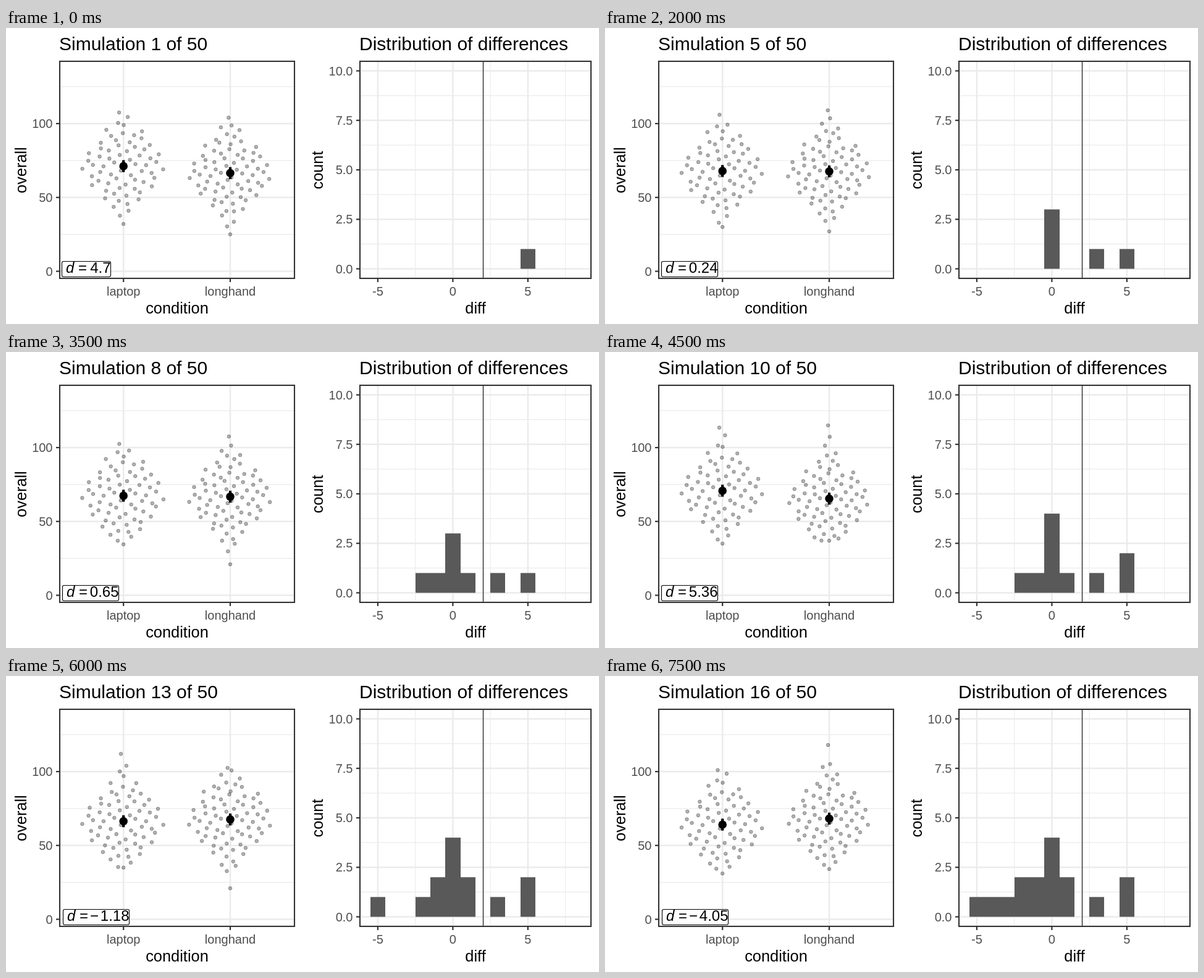
Recreate the animation shown at these times as an HTML page. Size 960 px wide and 480 px high, loop 8000 ms.

```html
<!DOCTYPE html>
<html lang="en">
<head>
<meta charset="utf-8">
<title>Simulation</title>
<style>
  html, body { margin: 0; width: 100%; height: 100%; overflow: hidden; background: #fff; }
  svg { display: block; width: 960px; height: 480px; font-family: "Liberation Sans", Arial, sans-serif; }
  .title { font-size: 30px; }
  .axis { font-size: 25.4px; text-anchor: middle; }
  .tick { font-size: 20px; fill: #4d4d4d; }
  .label { font-size: 24px; }
  .dots circle { fill-opacity: .3; stroke: #000; stroke-opacity: .3; }
</style>
</head>
<body>
<svg id="stage" viewBox="0 0 960 480"></svg>
<script>
const STEP = 500;
// difference, laptop mean, laptop min and max, longhand min and max
const SIMS = [
  [4.7, 71.2, 32, 107.5, 25, 104],
  [-0.31, 67.5, 28, 108, 30, 109],
  [3.17, 69.1, 29.5, 129.5, 30, 110.5],
  [0.38, 68.3, 31, 109, 29, 106],
  [0.24, 67.9, 30, 106, 27, 109],
  [-2.49, 67.4, 32.5, 110, 16.5, 111.5],
  [-1.12, 67, 29, 107, 31, 110],
  [0.65, 67.4, 34.5, 102.5, 21, 107.5],
  [-0.27, 67.8, 30, 108, 28, 107],
  [5.36, 70.8, 35, 113.5, 37, 115],
  [-4.86, 65.2, 28, 105, 32, 112],
  [1.14, 68.6, 31, 108, 27, 106],
  [-1.18, 66.4, 35, 112, 21, 102.5],
  [-2.13, 66.5, 29, 106, 30, 109],
  [-2.94, 66, 28, 107, 31, 110],
  [-4.05, 64.1, 31, 101, 34, 118]
];
const GROUPS = [
  { name: "laptop", x: 190.2, n: 68 },
  { name: "longhand", x: 363, n: 74 }
];
const SPREAD = 17.5, SWARM_WIDTH = 69;

const scoreY = v => 394.5 - v * 2.395;
const diffX = v => 723.4 + v * 24.3;
const countY = v => 390.5 - v * 32.1;

const stage = document.getElementById("stage");

function add(parent, tag, attrs, text) {
  const el = document.createElementNS("http://www.w3.org/2000/svg", tag);
  for (const key in attrs) el.setAttribute(key, attrs[key]);
  if (text !== undefined) el.textContent = text;
  parent.appendChild(el);
  return el;
}
const line = (parent, x1, y1, x2, y2, stroke, width) =>
  add(parent, "line", { x1, y1, x2, y2, stroke, "stroke-width": width });
const write = (parent, x, y, cls, text, more) =>
  add(parent, "text", { x, y, class: cls, ...more }, text);

function grid(box, xs, ys, width) {
  ys.forEach(y => line(stage, box.l, y, box.r, y, "#ebebeb", width));
  xs.forEach(x => line(stage, x, box.t, x, box.b, "#ebebeb", width));
}
function frame(box, xs, ys) {
  add(stage, "rect", { x: box.l, y: box.t, width: box.r - box.l, height: box.b - box.t,
    fill: "none", stroke: "#333", "stroke-width": 2.1 });
  xs.forEach(([x, text]) => {
    line(stage, x, box.b, x, box.b + 6, "#333", 2.2);
    write(stage, x, 434, "tick", text, { "text-anchor": "middle" });
  });
  ys.forEach(([y, text]) => {
    line(stage, box.l - 6, y, box.l, y, "#333", 2.2);
    write(stage, box.l - 11.5, y + 7, "tick", text, { "text-anchor": "end" });
  });
}
function axisTitles(x, xText, y, yText) {
  write(stage, x, 463, "axis", xText);
  write(stage, 0, 0, "axis", yText, { transform: `translate(${y} 230.5) rotate(-90)` });
}

function random(seed) {
  return () => {
    seed = (seed + 0x6D2B79F5) | 0;
    let t = Math.imul(seed ^ (seed >>> 15), 1 | seed);
    t = (t + Math.imul(t ^ (t >>> 7), 61 | t)) ^ t;
    return ((t ^ (t >>> 14)) >>> 0) / 4294967296;
  };
}

// Rational approximation of the normal quantile
function quantile(p) {
  if (p > .5) return -quantile(1 - p);
  const t = Math.sqrt(-2 * Math.log(p));
  return (2.515517 + .802853 * t + .010328 * t * t) /
    (1 + 1.432788 * t + .189269 * t * t + .001308 * t ** 3) - t;
}

function vanDerCorput(i) {
  let value = 0;
  for (let unit = .5; i; i >>= 1, unit /= 2) value += (i & 1) * unit;
  return value;
}

// Sorted normal scores whose tails bend to reach the given extremes
function scores(n, mean, min, max, seed) {
  const rand = random(seed), zMax = quantile(1 - .5 / n);
  return Array.from({ length: n }, (_, i) => {
    const inner = i > 0 && i < n - 1;
    const z = quantile((i + .5 + (inner ? (rand() - .5) * 1.1 : 0)) / n);
    const tail = (z < 0 ? mean - min : max - mean) / zMax;
    return mean + z * (SPREAD + (tail - SPREAD) * Math.abs(z / zMax) ** 3);
  }).sort((a, b) => a - b);
}

// Quasirandom offsets, scaled by the local density
function swarm(values) {
  const bandwidth = .45 * SPREAD * values.length ** -.2;
  const density = values.map(v =>
    values.reduce((sum, w) => sum + Math.exp(-.5 * ((v - w) / bandwidth) ** 2), 0));
  const peak = Math.max(...density);
  return values.map((v, i) => [
    (vanDerCorput(i + 1) - .5) * 2 * SWARM_WIDTH * density[i] / peak, scoreY(v)
  ]);
}

const left = { l: 87, r: 467, t: 54, b: 406 };
const right = { l: 573, r: 947, t: 54, b: 406 };

add(stage, "rect", { width: 960, height: 480, fill: "#fff" });
grid(left, [], [25, 75, 125].map(scoreY), 1.1);
grid(left, GROUPS.map(g => g.x), [0, 50, 100].map(scoreY), 2.5);
grid(right, [-2.5, 2.5, 7.5].map(diffX), [1.25, 3.75, 6.25, 8.75].map(countY), 1.1);
grid(right, [-5, 0, 5].map(diffX), [0, 2.5, 5, 7.5, 10].map(countY), 2.5);

const views = SIMS.map(([diff, mean, ...ends], s) => {
  const view = add(stage, "g", { visibility: "hidden" });
  write(view, 86, 36, "title", `Simulation ${s + 1} of ${SIMS.length + 34}`);

  GROUPS.forEach((group, k) => {
    const center = mean - k * diff;
    const dots = add(view, "g", { class: "dots" });
    swarm(scores(group.n, center, ends[2 * k], ends[2 * k + 1], s * 2 + k + 11))
      .forEach(([dx, cy]) => add(dots, "circle", { cx: group.x + dx, cy, r: 2.8 }));
    const y = scoreY(center);
    line(view, group.x, y - 9.7, group.x, y + 9.7, "#000", 4.2);
    add(view, "circle", { cx: group.x, cy: y, r: 6.8 });
  });

  const digits = String(Math.abs(diff)), negative = diff < 0;
  const x = negative ? 92.5 : digits.length > 3 ? 91.5 : 90.5;
  const end = negative ? 199.5 : digits.length > 3 ? 182.5 : 169.5;
  add(view, "rect", { x, y: 378.5, width: end - x, height: 25, rx: 2.5, fill: "#fff", stroke: "#000", "stroke-width": 1.1 });
  write(view, x + 6.5, 397, "label", "d", { "font-style": "italic" });
  write(view, x + 26.5, 397, "label", "=");
  if (negative) write(view, x + 43.5, 397, "label", "\u2212");
  write(view, end, 397, "label", digits, { "text-anchor": "end" });

  const counts = {};
  SIMS.slice(0, s + 1).forEach(([d]) => {
    const bin = Math.round(d);
    counts[bin] = (counts[bin] || 0) + 1;
  });
  for (const bin in counts) {
    add(view, "rect", { x: Math.round(diffX(bin - .5)), y: countY(counts[bin]),
      width: Math.round(diffX(+bin + .5)) - Math.round(diffX(bin - .5)),
      height: countY(0) - countY(counts[bin]), fill: "#595959" });
  }
  return view;
});

line(stage, 772.5, right.t, 772.5, right.b, "#000", 1.1);
frame(left, GROUPS.map(g => [g.x, g.name]), [0, 50, 100].map(v => [scoreY(v), v]));
frame(right, [-5, 0, 5].map(v => [diffX(v), v]),
  [0, 2.5, 5, 7.5, 10].map(v => [countY(v), v.toFixed(1)]));
axisTitles(277, "condition", 32.5, "overall");
axisTitles(760, "diff", 513, "count");
write(stage, 572, 36, "title", "Distribution of differences");

let shown = -1;
const start = performance.now();
function draw(now) {
  const index = Math.floor(Math.max(0, now - start) / STEP) % SIMS.length;
  if (index !== shown) {
    views.forEach((view, i) => view.setAttribute("visibility", i === index ? "visible" : "hidden"));
    shown = index;
  }
  requestAnimationFrame(draw);
}
draw(start);
</script>
</body>
</html>
```
